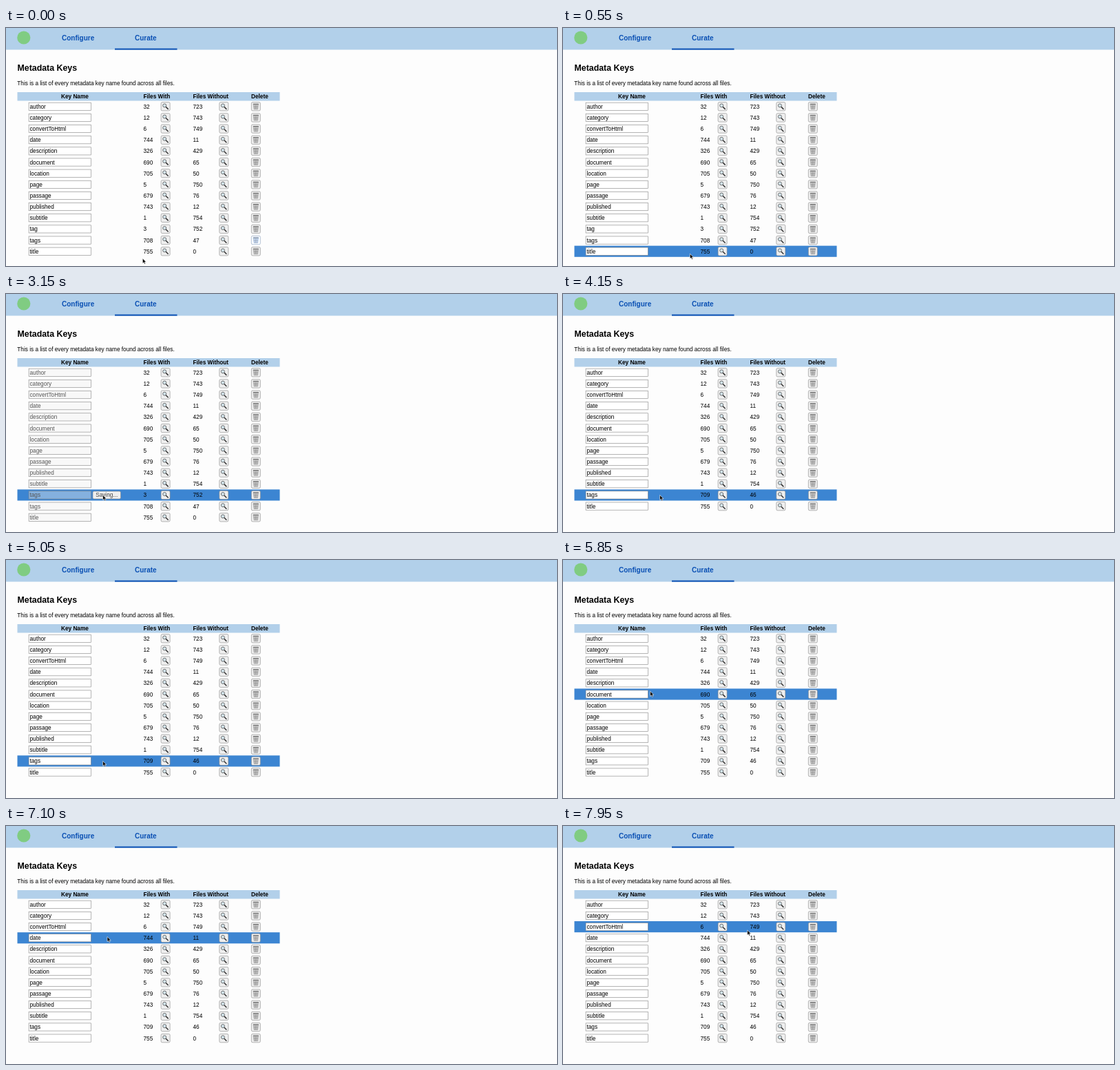
An HTML page that plays this animation: 800x345 px, repeating every 8000 ms.

```html
<!DOCTYPE html>
<html lang="en">
<head>
<meta charset="utf-8">
<title>Metadata Keys</title>
<style>
  html, body { margin: 0; width: 100%; height: 100%; overflow: hidden; background: #fdfdfd; }
  svg { display: block; width: 100%; height: 100%; }
  text { font: 8.24px "Liberation Sans", Arial, sans-serif; white-space: pre; }
  .bold { font-weight: bold; }
  .tab { font-weight: bold; font-size: 10px; fill: #0a50b4; }
  .title { font-weight: bold; font-size: 12.36px; }
  .field { fill: #fff; stroke: #858585; stroke-width: .6; }
  .button { fill: #efefef; stroke: #858585; stroke-width: .6; }
  .saving .field { fill: rgba(239, 239, 239, .4); }
  .saving .name { fill: #555; }
</style>
</head>
<body>
<svg viewBox="0 0 800 345">
  <defs>
    <g id="glass">
      <rect class="button" x="-6.5" y="-6.2" width="13" height="12.4" rx="1.8"/>
      <path d="M.6 .6 3.6 3.6" stroke="#333" stroke-width="1.5" stroke-linecap="round"/>
      <circle cx="-1.4" cy="-1.4" r="2.5" fill="#d5e6ee" stroke="#555" stroke-width=".8"/>
    </g>
    <g id="bin">
      <rect class="button" x="-6.5" y="-6.2" width="13" height="12.4" rx="1.8"/>
      <path d="M-3.6 -3.2H3.6L2.7 4H-2.7Z" fill="#ccc" stroke="#888" stroke-width=".6"/>
      <path d="M-1.5 -2.5-1.1 3.6M0 -2.5V3.6M1.5 -2.5 1.1 3.6M-3 .4H3" fill="none" stroke="#888" stroke-width=".5"/>
      <path d="M-4 -3.6H4" stroke="#666" stroke-width="1"/>
    </g>
  </defs>
  <rect width="800" height="345" fill="#fdfdfd"/>
  <rect width="800" height="31.5" fill="#b2d0ea"/>
  <circle cx="25.8" cy="14" r="9.6" fill="#80cc82"/>
  <text class="tab" x="81" y="17.7">Configure</text>
  <text class="tab" x="187" y="17.7">Curate</text>
  <rect x="158" y="29.6" width="90.5" height="2" fill="#0a50b4"/>
  <text class="title" x="16.5" y="62.2">Metadata Keys</text>
  <text x="16.3" y="82.7">This is a list of every metadata key name found across all files.</text>
  <rect x="16.5" y="93" width="381" height="12.5" fill="#b2d0ea"/>
  <text class="bold" x="80" y="102.3">Key Name</text>
  <text class="bold" x="199.5" y="102.3">Files With</text>
  <text class="bold" x="271.5" y="102.3">Files Without</text>
  <text class="bold" x="356" y="102.3">Delete</text>
  <rect id="band" x="16.5" width="381" height="16.15" fill="#3c85d2"/>
  <g id="table"></g>
  <g id="action">
    <rect class="button" x="126" y="286" width="40.5" height="11" rx="1.8"/>
    <text x="146.2" y="294.4" text-anchor="middle"></text>
  </g>
  <path id="caret" d="M0 287V296" stroke="#000" stroke-width=".7"/>
  <path id="arrow" d="M0 0V7.2L1.7 5.7 2.8 8.2 4.1 7.6 3 5.2H5.3Z" fill="#000" stroke="#fff" stroke-width=".6"/>
  <path id="beam" d="M-1.4 -4Q0 -4 0 -3Q0 -4 1.4 -4M0 -3V3M-1.4 4Q0 4 0 3Q0 4 1.4 4" fill="none" stroke="#222" stroke-width=".8"/>
</svg>
<script>
const LOOP = 8000, TOP = 105.7, ROW = 16.15, EDITED = 11;
const CLICK = 1200, TYPE = 1450, SAVE = 2600, SAVED = 3850;

const before = [
  ['author', 32], ['category', 12], ['convertToHtml', 6], ['date', 744],
  ['description', 326], ['document', 690], ['location', 705], ['page', 5],
  ['passage', 679], ['published', 743], ['subtitle', 1], ['tag', 3],
  ['tags', 708], ['title', 755]
];
const typed = before.map(([key, n], i) => [i === EDITED ? 'tags' : key, n]);
const merged = [...before.slice(0, EDITED), ['tags', 709], before[13]];

// time, x, y
const path = [
  [0, 198.3, 334], [400, 198.3, 334], [1000, 110, 291.5], [2000, 110, 291.5],
  [2450, 140.6, 291.5], [5300, 140.6, 291.5], [6100, 122.4, 160], [6400, 122.4, 160],
  [6900, 147, 160.5], [7200, 147, 160.5], [7550, 205, 153], [7900, 267.6, 151],
  [LOOP, 267.6, 151]
];

const $ = id => document.getElementById(id);
const show = (el, on) => el.setAttribute('visibility', on ? 'visible' : 'hidden');
const place = (el, x, y) => el.setAttribute('transform', `translate(${x} ${y})`);
const label = $('action').querySelector('text');

$('table').innerHTML = before.map((_, i) => `
  <g transform="translate(0 ${TOP + ROW * (i + .5)})">
    <rect class="field" x="33.1" y="-5.6" width="90.2" height="11.2"/>
    <text class="name" x="34.5" y="3"></text>
    <text x="199.5" y="3"></text>
    <text x="271.5" y="3"></text>
    <use href="#glass" x="231.6"/>
    <use href="#glass" x="316.3"/>
    <use class="bin" href="#bin" x="362.8"/>
  </g>`).join('');
const rows = [...$('table').children];
const pressedBin = rows[12].querySelector('.bin');

let shown;
function fill(data) {
  if (data === shown) return;
  shown = data;
  rows.forEach((row, i) => {
    show(row, i < data.length);
    if (i >= data.length) return;
    const [key, count] = data[i];
    const cells = [key, count, 755 - count];
    row.querySelectorAll('text').forEach((cell, c) => cell.textContent = cells[c]);
  });
}

function pointerAt(t) {
  const i = path.findIndex(p => p[0] > t);
  const [t0, x0, y0] = path[i - 1], [t1, x1, y1] = path[i];
  const u = (t - t0) / (t1 - t0), k = u * u * (3 - 2 * u);
  return [x0 + (x1 - x0) * k, y0 + (y1 - y0) * k];
}

function draw(t) {
  const data = t < TYPE ? before : t < SAVED ? typed : merged;
  fill(data);
  const saving = t >= SAVE && t < SAVED;
  $('table').setAttribute('class', saving ? 'saving' : '');
  pressedBin.style.filter = t < 450 ? 'sepia(.5) hue-rotate(175deg)' : '';

  const [x, y] = pointerAt(t);
  const hover = Math.floor((y - TOP) / ROW);
  show($('band'), hover >= 0 && hover < data.length);
  $('band').setAttribute('y', TOP + hover * ROW);

  show($('action'), t >= TYPE && t < SAVED);
  label.textContent = saving ? 'Saving...' : 'Rename';
  label.setAttribute('fill', saving ? '#444' : '#000');

  const blink = t - (t < TYPE ? CLICK : TYPE);
  show($('caret'), t >= CLICK && t < SAVE && blink % 1000 < 500);
  place($('caret'), t < TYPE ? 46.3 : 50.4, 0);

  const offset = Math.abs(y - TOP - (hover + .5) * ROW);
  const overField = hover < data.length && x > 33 && x < 123.4 && offset < 5.7;
  const hidden = t >= TYPE - 100 && t < 2050;
  show($('arrow'), !hidden && !overField);
  show($('beam'), !hidden && overField);
  place($('arrow'), x, y);
  place($('beam'), x, y);
}

const start = performance.now();
function tick() {
  draw((performance.now() - start) % LOOP);
  requestAnimationFrame(tick);
}
tick();
</script>
</body>
</html>
```
